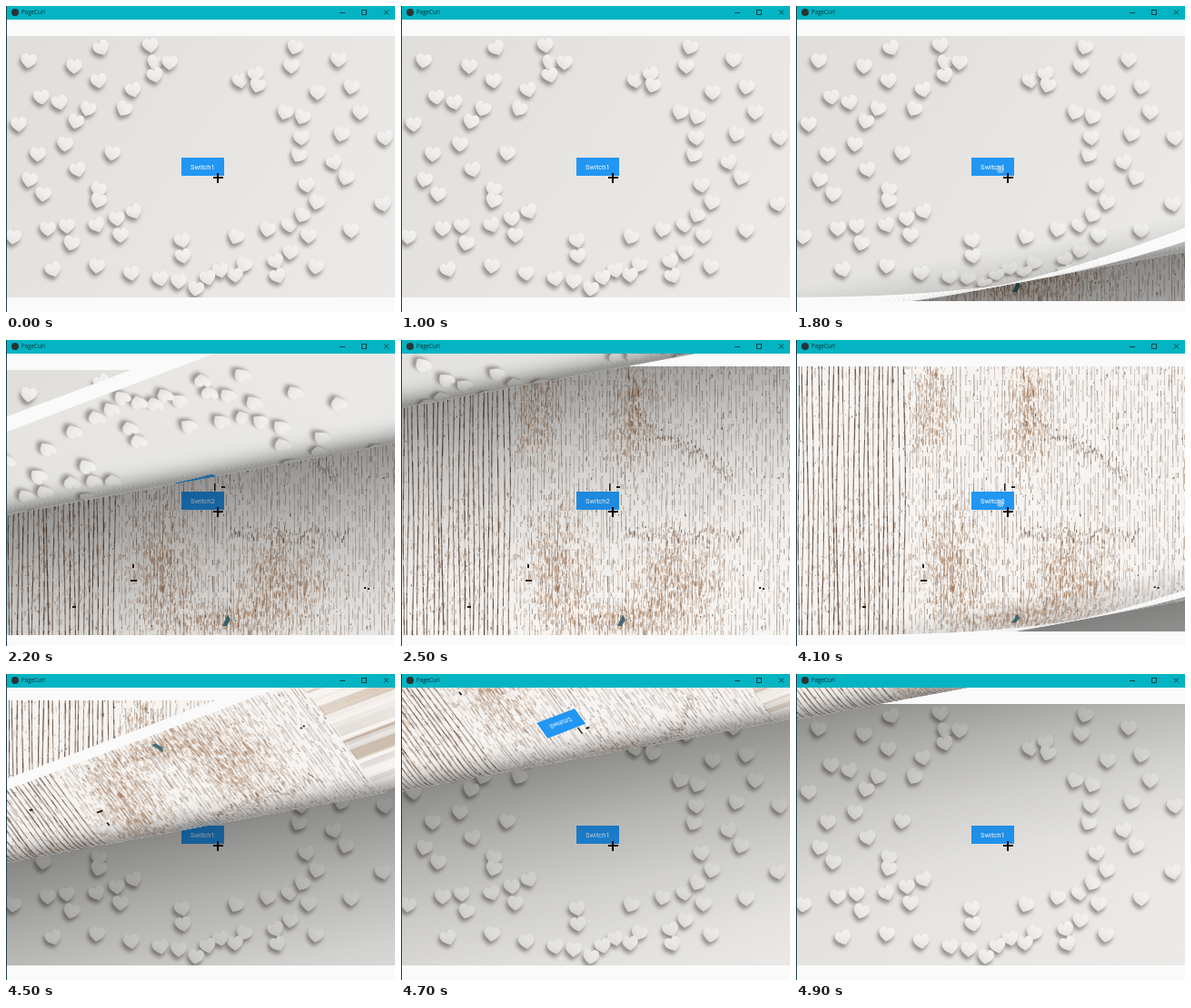
An HTML page with a canvas that plays this animation: 428x337 px, repeating every 5000 ms.

```html
<!DOCTYPE html>
<html lang="en">
<head>
<meta charset="utf-8">
<title>PageCurl</title>
<style>
  html, body { margin: 0; width: 100%; height: 100%; overflow: hidden; background: #fafafa; }
  canvas { display: block; }
</style>
</head>
<body>
<canvas id="stage" width="428" height="337"></canvas>
<script>
const W = 428, H = 337, BAR = 15, LOOP = 5000, STEP = 100;
const EXTENDED = 900;            // pages continue to the right with their last column
const RADIUS = 40;               // radius of the rolled part
const HALF = Math.PI * RADIUS;   // arc length of the rolled part
const SLOPE = 0.185;             // tilt of the fold
const PULL = { x: 0.31, y: 0.943 };
const FLAP = 1.92;               // 2 would lay the flap perfectly flat
const ctx = document.getElementById('stage').getContext('2d');

function seeded(seed) {
  return () => (seed = (seed * 16807) % 2147483647) / 2147483647;
}

function makePage(label, top, bottom, paint) {
  const image = document.createElement('canvas');
  image.width = EXTENDED;
  image.height = H;
  const c = image.getContext('2d');
  c.fillStyle = '#fafafa';
  c.fillRect(0, 0, EXTENDED, H);
  c.save();
  c.beginPath();
  c.rect(0, top, W, bottom - top);
  c.clip();
  paint(c);
  c.restore();
  c.fillStyle = '#2196f3';
  c.fillRect(193, 167, 47, 20);
  c.fillStyle = '#fff';
  c.font = '7.5px Roboto, sans-serif';
  c.textAlign = 'center';
  c.fillText(label, 216.3, 179.6);
  c.drawImage(image, W - 1, 0, 1, H, W, 0, EXTENDED - W, H);
  return { image, top, bottom };
}

const HEARTS = [
  105,46, 159,43, 25,60, 75,66, 164,62, 180,62, 102,82, 164,76, 140,92, 39,100,
  59,106, 90,113, 130,113, 14,130, 77,127, 65,152, 117,162, 35,163, 79,180, 26,191,
  41,207, 102,202, 102,214, 141,226, 100,241, 122,234, 126,252, 67,242, 46,245, 72,261,
  8,254, 52,290, 100,286, 138,294, 194,258, 195,275, 253,254, 288,246, 312,241, 326,230,
  333,253, 342,216, 331,197, 380,247, 415,218, 361,172, 374,189, 369,141, 417,145, 322,164,
  325,145, 326,122, 307,117, 343,95, 314,66, 318,45, 366,59, 380,89, 390,117, 258,82,
  275,75, 277,87, 341,287, 313,271, 297,281, 299,297, 262,285, 252,296, 236,291, 222,299,
  190,303, 170,300, 209,311
];

function paintHeart(c, x, y, angle) {
  c.save();
  c.translate(x, y);
  c.rotate(angle);
  c.scale(1.06, 0.96);
  c.beginPath();
  c.moveTo(0, 9);
  c.bezierCurveTo(-3, 7, -10, 2, -8, -4);
  c.bezierCurveTo(-7, -9, -1, -9, 0, -5);
  c.bezierCurveTo(1, -9, 7, -9, 8, -4);
  c.bezierCurveTo(10, 2, 3, 7, 0, 9);
  c.shadowColor = 'rgba(95,90,85,.6)';
  c.shadowBlur = 4;
  c.shadowOffsetX = -2;
  c.shadowOffsetY = 4;
  const g = c.createLinearGradient(-5, 7, 4, -7);
  g.addColorStop(0, '#e0dfdc');
  g.addColorStop(0.5, '#eeedeb');
  g.addColorStop(1, '#f2f1ef');
  c.fillStyle = g;
  c.fill();
  c.restore();
}

function paintHearts(c) {
  const rnd = seeded(71);
  const g = c.createLinearGradient(0, 33, W, 321);
  g.addColorStop(0, '#dfdedb');
  g.addColorStop(0.5, '#e6e5e2');
  g.addColorStop(1, '#ebeae8');
  c.fillStyle = g;
  c.fillRect(0, 0, W, H);
  for (let i = 0; i < HEARTS.length; i += 2) {
    paintHeart(c, HEARTS[i], HEARTS[i + 1], (rnd() - 0.5) * 0.9);
  }
}

function paintWood(c) {
  const rnd = seeded(2024);
  const spread = () => rnd() + rnd() + rnd() - 1.5;
  c.fillStyle = '#f6f3f0';
  c.fillRect(0, 0, W, H);

  const speck = (x, y, color, alpha, length) => {
    c.fillStyle = `rgba(${color},${alpha * (0.3 + rnd())})`;
    c.fillRect(x, y, 0.6 + rnd() * 0.8, 1 + rnd() * length);
  };
  const scatter = (count, color, alpha, length) => {
    for (let i = 0; i < count; i++) speck(rnd() * W, 20 + rnd() * 310, color, alpha, length);
  };
  const weather = (x, y, rx, ry, count) => {
    for (let i = 0; i < count; i++) {
      speck(x + spread() * rx, y + spread() * ry, '150,98,58', 0.4, 6);
    }
  };

  // long grain, widely spaced and dark on the left plank
  for (let x = 3; x < W;) {
    const left = x < 125;
    const weight = left ? 0.75 : 0.36 + 0.12 * rnd();
    const phase = rnd() * 6, bend = 0.5 + rnd() * 0.7, width = left ? 0.9 + rnd() * 0.6 : 0.5 + rnd() * 0.5;
    const at = y => x + bend * Math.sin(y / 45 + phase);
    for (let y = 20; y < 330; y += 6) {
      if (!left && rnd() < 0.3) continue;
      c.strokeStyle = `rgba(72,50,38,${weight * (0.6 + rnd() * 0.6)})`;
      c.lineWidth = width;
      c.beginPath();
      c.moveTo(at(y), y);
      c.lineTo(at(y + 6), y + 6);
      c.stroke();
    }
    x += left ? 4.4 + rnd() * 2.2 : 2.8 + rnd() * 2.4;
  }
  scatter(900, '140,110,90', 0.3, 8);
  scatter(1400, '255,255,255', 0.6, 9);
  weather(60, 240, 60, 90, 350);
  weather(150, 75, 25, 60, 450);
  weather(172, 255, 40, 75, 1000);
  weather(255, 75, 26, 70, 700);
  weather(300, 265, 60, 60, 1100);
  weather(245, 305, 60, 20, 450);
  scatter(700, '50,38,32', 0.45, 2);

  // cracked ridges
  for (let i = 0; i < 75; i++) {
    const u = i / 75;
    speck(275 + u * 90, 95 + u * 48 + spread() * 10, '85,55,35', 0.55, 6);
    speck(245 + u * 135, 212 + spread() * 8, '85,55,35', 0.55, 6);
  }
  c.fillStyle = '#241e1b';
  c.fillRect(137, 264, 7, 2);
  c.fillRect(139, 247, 2, 4);
  c.fillRect(73, 293, 4, 2);
  c.fillRect(229, 158, 1.5, 8);
  c.fillRect(237, 161, 4, 2);
  c.fillRect(394, 272, 2, 2);
  c.fillRect(398, 273, 2, 2);
  c.fillStyle = '#426b70';
  c.beginPath();
  c.moveTo(238, 315);
  c.lineTo(244, 302);
  c.lineTo(247, 308);
  c.lineTo(243, 315);
  c.fill();

  const tones = ['#f6f2ed', '#ede5dc', '#fbf9f6', '#c9b39c', '#f3eee8', '#f9f6f2'];
  for (let y = 20; y < 330;) {
    const h = 2 + rnd() * 7;
    c.fillStyle = tones[Math.floor(rnd() * tones.length)];
    c.fillRect(W - 1, y, 1, h);
    y += h;
  }
}

const hearts = makePage('Switch1', 33, 321, paintHearts);
const wood = makePage('Switch2', 29, 325, paintWood);

// foldAt: height of the fold on the left edge, moving up at a steady speed
const CURLS = [
  { from: 1500, to: 2700, page: hearts, next: wood, foldAt: t => 350 - 0.393 * (t - 1800) },
  { from: 3850, to: LOOP, page: wood, next: hearts, foldAt: t => 366 - 0.395 * (t - 4100) }
];

// How far a point is carried back when it lies s past the roll's contact line.
function carry(s) {
  if (s <= 0) return 0;
  if (s >= HALF) return HALF + FLAP * (s - HALF);
  return s - RADIUS * Math.sin(s / RADIUS);
}

function shade(s) {
  if (s <= 0 || s >= HALF) return 0;
  const side = Math.sin(s / RADIUS);
  return s < HALF / 2 ? 0.14 * side : 0.5 * side ** 3;
}

function drawStrip(page, contact, a, b) {
  const rate = (carry(b) - carry(a)) / (b - a);
  const base = carry(a) - rate * (a + contact);
  const edge = (s, x) => contact + s - SLOPE * x;
  ctx.save();
  ctx.transform(1 - PULL.x * rate * SLOPE, -PULL.y * rate * SLOPE,
    -PULL.x * rate, 1 - PULL.y * rate, -PULL.x * base, -PULL.y * base);
  ctx.beginPath();
  ctx.moveTo(0, edge(a, 0));
  ctx.lineTo(EXTENDED, edge(a, EXTENDED));
  ctx.lineTo(EXTENDED, edge(b + 0.8, EXTENDED));
  ctx.lineTo(0, edge(b + 0.8, 0));
  ctx.clip();
  ctx.drawImage(page.image, 0, 0);
  const dark = shade((a + b) / 2);
  if (dark > 0) {
    ctx.fillStyle = `rgba(0,0,0,${dark})`;
    ctx.fillRect(0, page.top, EXTENDED, page.bottom - page.top);
  }
  ctx.restore();
}

function drawShadow(page, fold, progress) {
  const reach = 420 - 200 * progress;
  const alpha = 0.46 - 0.12 * progress;
  const g = ctx.createLinearGradient(0, fold, SLOPE * reach, fold + reach);
  for (let u = 0; u <= 1; u += 0.25) {
    g.addColorStop(u, `rgba(0,0,0,${alpha * (1 - u) ** 1.9})`);
  }
  ctx.fillStyle = g;
  ctx.fillRect(0, page.top, W, page.bottom - page.top);
}

function drawCurl(curl, t) {
  const fold = curl.foldAt(t), contact = fold - RADIUS, count = 64;
  ctx.drawImage(curl.next.image, 0, 0);
  drawShadow(curl.next, fold, Math.min(1, Math.max(0, (410 - fold) / 400)));
  drawStrip(curl.page, contact, -1500, 0);
  for (let i = 0; i < count; i++) {
    drawStrip(curl.page, contact, HALF * i / count, HALF * (i + 1) / count);
  }
  drawStrip(curl.page, contact, HALF, 1500);
  if (fold > 300 && fold < 425) {
    ctx.fillStyle = 'rgba(190,215,235,.6)';
    ctx.beginPath();
    ctx.arc(225, 180, 4, 0, Math.PI * 2);
    ctx.fill();
  }
}

function drawWindow() {
  ctx.fillStyle = '#04b4c3';
  ctx.fillRect(0, 0, W, BAR);
  ctx.fillStyle = '#173f49';
  ctx.fillRect(0, 0, 1, H);
  ctx.fillStyle = '#2b3335';
  ctx.beginPath();
  ctx.arc(10, 7, 4, 0, Math.PI * 2);
  ctx.fill();
  ctx.fillStyle = '#062c31';
  ctx.font = '6.2px "Open Sans", sans-serif';
  ctx.fillText('PageCurl', 17, 9.4);
  ctx.strokeStyle = '#0a343a';
  ctx.lineWidth = 0.9;
  ctx.strokeRect(391.5, 4.5, 5, 5);
  ctx.beginPath();
  ctx.moveTo(367, 7.5);
  ctx.lineTo(373, 7.5);
  ctx.moveTo(416, 4.5);
  ctx.lineTo(421, 9.5);
  ctx.moveTo(421, 4.5);
  ctx.lineTo(416, 9.5);
  ctx.stroke();
  ctx.fillStyle = '#000';
  ctx.fillRect(228, 188, 11, 2);
  ctx.fillRect(232, 184, 2, 11);
}

function frame(now) {
  const t = Math.floor((now % LOOP) / STEP) * STEP;
  const curl = CURLS.find(c => t >= c.from && t < c.to);
  if (curl) drawCurl(curl, t);
  else ctx.drawImage((t < CURLS[0].from ? hearts : wood).image, 0, 0);
  drawWindow();
  requestAnimationFrame(frame);
}
frame(performance.now());
</script>
</body>
</html>
```
